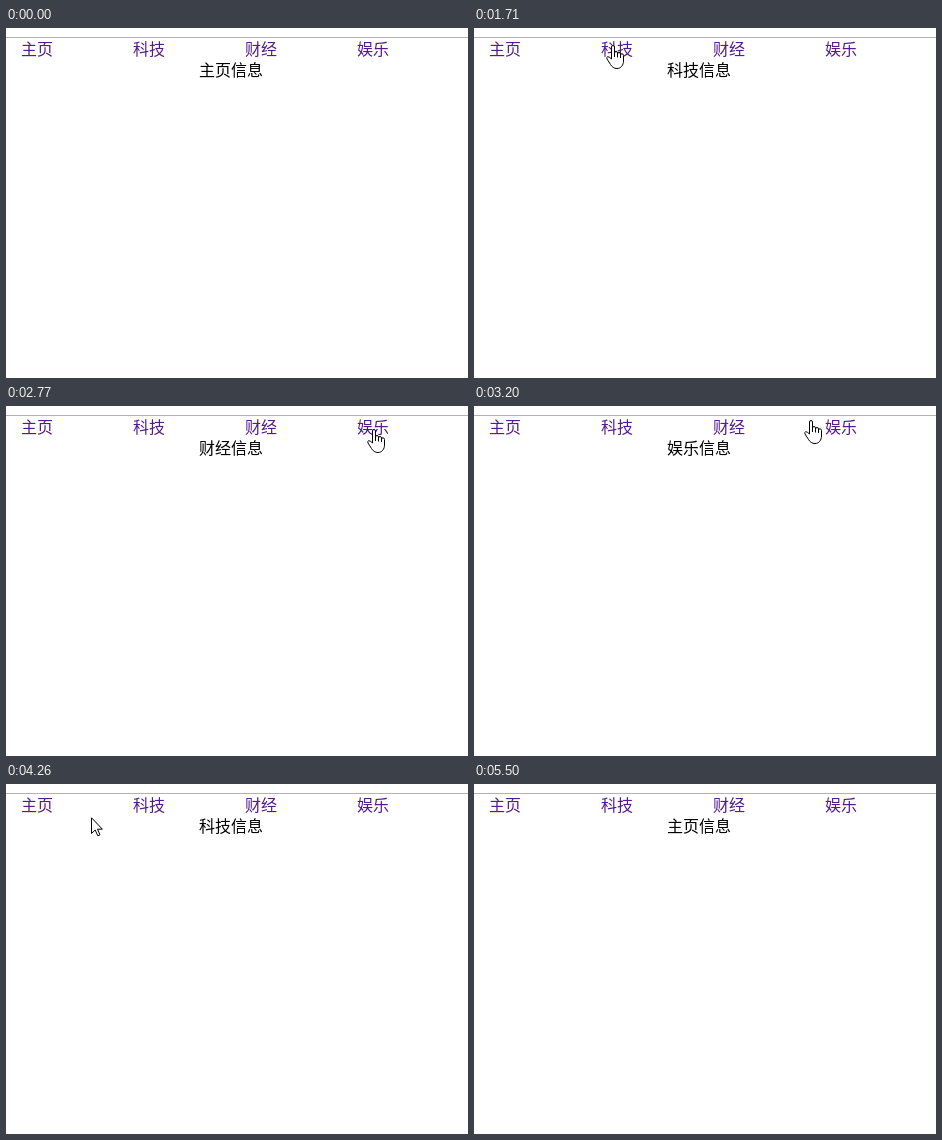
These frames come from a looping animation (462x350 px, 5930 ms). An HTML page:

```html
<!DOCTYPE html>
<html lang="zh-CN">
<head>
<meta charset="utf-8">
<title>导航</title>
<style>
html, body { margin: 0; width: 100%; height: 100%; overflow: hidden; background: #fff; }
svg { display: block; }
text { font: 350 16px "Noto Sans CJK SC DemiLight", "Noto Sans CJK SC", "Noto Sans CJK", sans-serif; }
#nav text { fill: #551a8b; }
#nav text.active { fill: #f00; }
#arrow, #hand { fill: #fff; stroke: #000; stroke-linejoin: round; }
</style>
</head>
<body>
<svg width="462" height="350" viewBox="0 0 462 350">
  <rect y="9" width="462" height="1" fill="#b2b2b2"/>
  <g id="nav"></g>
  <text id="info" x="193" y="48"></text>
  <path id="arrow" d="M.5 .8V16.5L4.2 13L6.8 18.8L9 17.8L6.5 12.2H11.4Z"/>
  <g id="hand">
    <path d="M-.5 14V2Q-.5 .5 1 .5T2.5 2V8Q2.5 6.500 4 6.500T5.500 8V9Q5.500 7.500 7 7.500T8.500 9V10Q8.500 8.800 10 8.800T11.500 10.500V16C11.500 20 9 23.500 5 23.500C2 23.500 0 22 -1.500 19.500L-5 14Q-5.800 12.200 -4.300 11.700Q-3 11.500 -.5 14Z"/>
    <path fill="none" d="M2.500 8V12M5.500 9V12.500M8.500 10V13"/>
  </g>
</svg>
<script>
const LOOP = 5930, START = 112, STEP = 68, LIFT = 12;
const labels = ["主页", "科技", "财经", "娱乐"];
const $ = id => document.getElementById(id);

// Pointer stops: time, x, y and the link clicked there, if any
const stops = [
  [START, 369, 313], [656, 59, 60], [860, 39, 16], [1064, 39, 16, 0],
  [1268, 79, 17], [1400, 138, 17], [1676, 138, 17, 1],
  [2220, 259, 17], [2356, 259, 17, 2], [2764, 367, 23], [3020, 369, 25, 3],
  [3444, 276, 24, 2], [3580, 271, 26], [4000, 138, 17, 1],
  [4260, 85, 33], [4530, 38, 17, 0], [4750, 51, 30],
  [5360, 419, 330], [5480, 419, 345]
];
const clicks = stops.filter(s => s.length > 3);

const links = labels.map((label, i) => {
  const el = document.createElementNS("http://www.w3.org/2000/svg", "text");
  el.setAttribute("x", 15 + 112 * i);
  el.setAttribute("y", 27);
  el.textContent = label;
  $("nav").append(el);
  return el;
});

// The pointer rises in a small arc as it leaves a clicked link
function pointer(t) {
  const i = stops.findIndex(s => s[0] > t);
  if (i < 1) return null;
  const [t0, x0, y0, link] = stops[i - 1], [t1, x1, y1] = stops[i];
  const k = (t - t0) / (t1 - t0);
  const lift = link === undefined ? 0 : LIFT * Math.sin(Math.PI * k);
  return [x0 + (x1 - x0) * k, y0 + (y1 - y0) * k - lift].map(Math.round);
}

function place(el, pos, shown) {
  el.style.display = shown ? "" : "none";
  if (shown) el.setAttribute("transform", `translate(${pos})`);
}

function draw(now) {
  // The picture refreshes in even steps
  const t = START + STEP * Math.floor((now % LOOP - START) / STEP);
  let page = 0, active = -1;
  for (const [time, , , link] of clicks) {
    if (t >= time) page = link;
    else if (t >= time - STEP) active = link;
  }
  links.forEach((el, i) => el.classList.toggle("active", i === active));
  $("info").textContent = labels[page] + "信息";

  const pos = pointer(t);
  const overNav = pos && pos[1] > 9 && pos[1] < 32;
  place($("hand"), pos, overNav);
  place($("arrow"), pos, pos && !overNav);
}

const begin = performance.now();
function tick() {
  draw(performance.now() - begin);
  requestAnimationFrame(tick);
}
tick();
</script>
</body>
</html>
```
